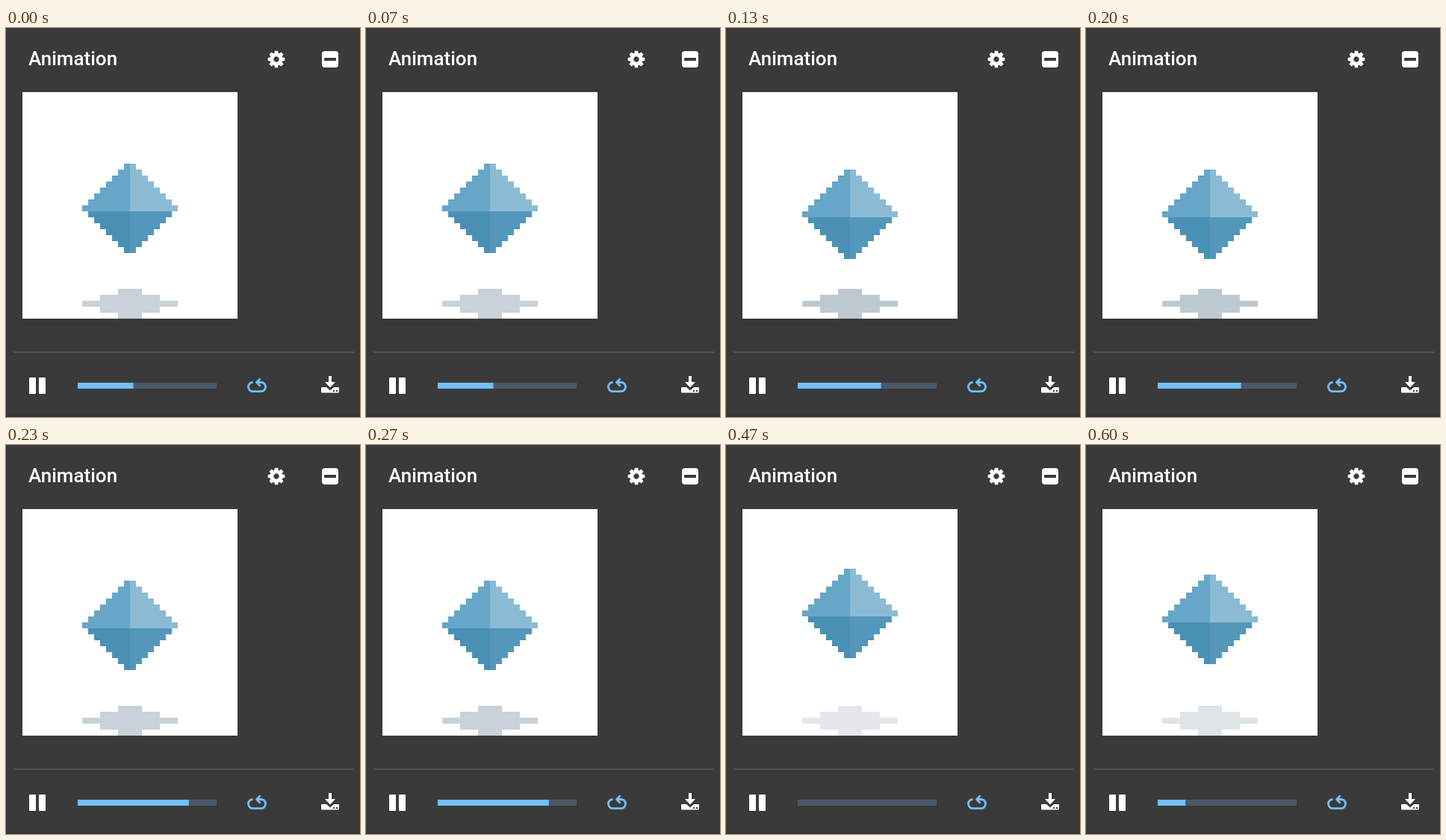
An HTML page for the animation above (0.63 s loop, 474x522 px).

```html
<!DOCTYPE html>
<html>
<head>
<meta charset="utf-8">
<style>
  html, body { margin: 0; width: 100%; height: 100%; overflow: hidden; background: #3a3a3a; }
  svg { display: block; }
</style>
</head>
<body>
<svg width="474" height="522" viewBox="0 0 474 522" fill="#fff">
  <path fill="#383338" d="M0 519h474v3H0z"/>
  <text x="30" y="50" font-family="Roboto, sans-serif" font-size="26" font-weight="500">Animation</text>

  <g id="gear" transform="translate(362 42)">
    <circle r="6.1" fill="none" stroke="#fff" stroke-width="4.8"/>
  </g>
  <rect x="423" y="31" width="22" height="22" rx="4"/>
  <rect x="426" y="40" width="16" height="4" rx="1" fill="#3a3a3a"/>

  <path d="M22 86h288v304H22z"/>
  <path id="shadow" shape-rendering="crispEdges"
    d="M150 350h32v8h24v8h24v8h-24v8h-24v8h-32v-8h-24v-8h-24v-8h24v-8h24z"/>
  <g id="gem" shape-rendering="crispEdges"></g>

  <path fill="#505050" d="M10 434h456v2H10z"/>
  <rect x="31" y="469" width="9" height="22" rx="1"/>
  <rect x="44" y="469" width="9" height="22" rx="1"/>
  <path fill="#4a5a69" d="M96 476h186v8H96z"/>
  <rect id="bar" x="96" y="476" height="8" fill="#73bffc"/>

  <g fill="none" stroke="#73bffc" stroke-width="2.8">
    <path d="M330.5 475.5a6.1 6.1 0 0 0 0 12.2h11a6.1 6.1 0 0 0 0 -12.2h-5"/>
    <path d="M340.5 470.5l-5 5 5 5"/>
  </g>

  <path d="M432 467h4v8h5l-7 7.5-7-7.5h5z"/>
  <path d="M423 482h6l5 4.5 5-4.5h6q1 0 1 1v5q0 1.5-1.5 1.5h-21q-1.500 0-1.500-1.500v-5q0-1 1-1z"/>
  <path fill="#3a3a3a" d="M438 486h2v2h-2zM442 486h2v2h-2z"/>
</svg>
<script>
const LOOP = 630, PIXEL = 8, CENTER = 166;
// Start time, progress in sixths of the bar's run, gem offset in pixels, shadow colour
const poses = [
  [0, 0.4, 2, '#c8d2d8'],
  [100, 0.6, 3, '#bdc9d0'],
  [230, 0.8, 2, '#c8d2d8'],
  [330, 1, 1, '#d9dee2'],
  [470, 0, 0, '#e4e7ec'],
  [600, 0.2, 1, '#dfe4e8']
];
const get = id => document.getElementById(id);
const gear = get('gear'), gem = get('gem'), bar = get('bar'), shadow = get('shadow');

function add(parent, tag, attrs) {
  const node = document.createElementNS('http://www.w3.org/2000/svg', tag);
  for (const key in attrs) node.setAttribute(key, attrs[key]);
  parent.append(node);
}

for (let i = 0; i < 8; i++) {
  add(gear, 'path', { d: 'M-2.8 -7.500L-2.100 -11.300H2.100L2.800 -7.500z', transform: `rotate(${i * 45})` });
}

for (let row = 0; row < 15; row++) {
  const upper = row < 8;
  const width = PIXEL * (upper ? row + 1 : 15 - row);
  const y = 166 + row * PIXEL;
  const [left, right] = upper ? ['#66a6c9', '#8bbbd5'] : ['#4a90b5', '#5596bb'];
  add(gem, 'rect', { x: CENTER - width, y, width, height: PIXEL, fill: left });
  add(gem, 'rect', { x: CENTER, y, width, height: PIXEL, fill: right });
}

function draw(now) {
  const time = now % LOOP;
  const [, progress, drop, color] = poses.findLast(pose => pose[0] <= time);
  gem.setAttribute('transform', `translate(0 ${drop * PIXEL})`);
  bar.setAttribute('width', 186 * progress);
  shadow.setAttribute('fill', color);
  requestAnimationFrame(() => draw(performance.now()));
}
draw(performance.now());
</script>
</body>
</html>
```
